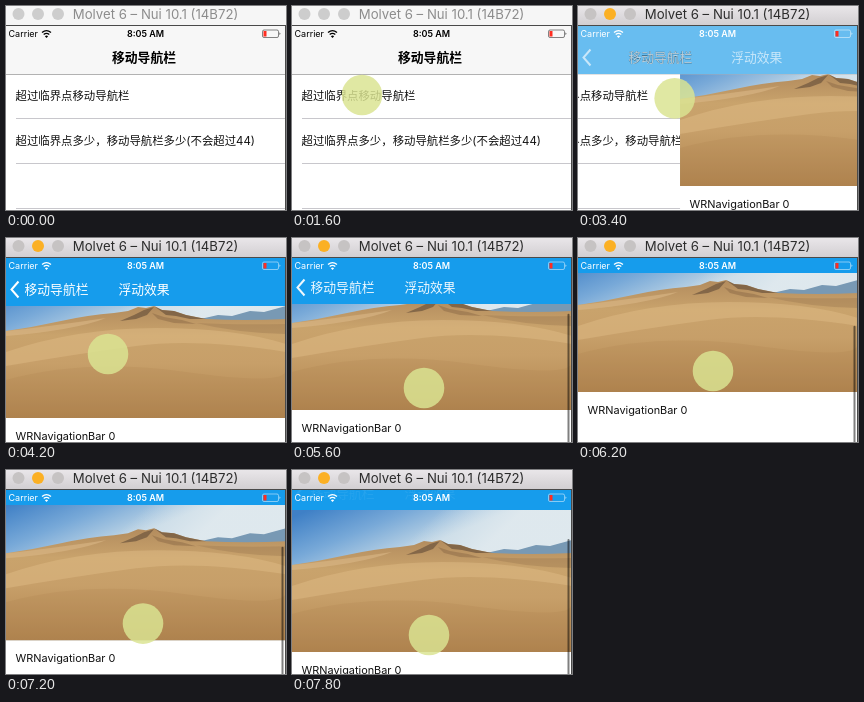
Write an HTML page that moves like this. It is 280 px wide and 204 px high and loops after 8 s.

```html
<!DOCTYPE html>
<html lang="zh-CN">
<head>
<meta charset="utf-8">
<title>移动导航栏</title>
<style>
html, body { margin: 0; width: 100%; height: 100%; overflow: hidden; background: #fff; }
svg { display: block; width: 280px; height: 204px; }
text { font-family: Inter, "Noto Sans CJK SC", sans-serif; }
.mid { text-anchor: middle; }
.nav { font-size: 12.8px; }
.bold { font-weight: 600; }
.medium { font-weight: 500; }
.light { font-weight: 300; }
.cell { font-size: 11.4px; fill: #111; }
.status { font-size: 9px; }
</style>
</head>
<body>
<svg viewBox="0 0 280 204" xmlns="http://www.w3.org/2000/svg">
  <defs>
    <linearGradient id="chrome" x2="0" y2="1">
      <stop offset="0" stop-color="#e9e6e9"/><stop offset="1" stop-color="#d2cfd2"/>
    </linearGradient>
    <linearGradient id="sky" gradientUnits="userSpaceOnUse" x1="70" y1="0" x2="100" y2="72">
      <stop offset="0" stop-color="#3f80c6"/><stop offset=".5" stop-color="#78a9d8"/><stop offset="1" stop-color="#c3d8e6"/>
    </linearGradient>
    <linearGradient id="haze" gradientUnits="userSpaceOnUse" x1="150" y1="20" x2="190" y2="62">
      <stop offset="0" stop-color="#e3ebef" stop-opacity="0"/><stop offset="1" stop-color="#e3ebef" stop-opacity=".85"/>
    </linearGradient>
    <linearGradient id="sand" gradientUnits="userSpaceOnUse" x1="0" y1="54" x2="0" y2="164">
      <stop offset="0" stop-color="#b48d5e"/><stop offset=".25" stop-color="#c9a36c"/>
      <stop offset=".5" stop-color="#c79f69"/><stop offset="1" stop-color="#b0844f"/>
    </linearGradient>
    <clipPath id="screen"><rect y="20" width="280" height="184"/></clipPath>
  </defs>

  <g clip-path="url(#screen)">
    <rect y="20" width="280" height="184" fill="#fff"/>
    <g id="list">
      <rect y="20" width="280" height="184" fill="#fff"/>
      <text class="cell" x="9.5" y="94.4">超过临界点移动导航栏</text>
      <text class="cell" x="9.5" y="139.4">超过临界点多少，移动导航栏多少(不会超过44)</text>
      <path d="M10 112.5H280M10 157.5H280M10 202.5H280" stroke="#c8c7cc"/>
    </g>

    <g id="page">
      <rect y="20" width="280" height="184" fill="#fff"/>
      <g id="scroll">
        <rect width="280" height="164" fill="url(#sky)"/>
        <rect width="280" height="75" fill="url(#haze)"/>
        <path d="M190 66L212 61 226 62 244 57 258 58 280 52V72H190Z" fill="#7899b4"/>
        <path d="M0 77Q28 73 55 67T108 59L122 57 132 53 140 54 148 52 156 56 168 57 180 61 200 65Q240 67 280 65V164H0Z" fill="url(#sand)"/>
        <path d="M148 52L156 56 168 57 180 61 200 65 184 65 170 62 160 61ZM148 53L141 61 130 65 114 67 128 61 138 56Z" fill="#72583f" opacity=".75"/>
        <path d="M146 59L158 63 176 66 190 70 168 69 152 65Z" fill="#8c6b47" opacity=".5"/>
        <path d="M0 77Q40 73 100 64Q70 76 0 82Z" fill="#dab887" opacity=".6"/>
        <path d="M0 98Q70 74 150 74T280 90V98Q190 84 130 92T0 112Z" fill="#e0bd88" opacity=".45"/>
        <path d="M190 69Q230 71 280 70V80Q230 79 190 69Z" fill="#a17d52" opacity=".45"/>
        <path d="M0 126Q80 104 180 118T280 116V164H0Z" fill="#a87c49" opacity=".18"/>
        <text class="cell" x="9.5" y="185.7" style="font-size:10.9px">WRNavigationBar 0</text>
      </g>
      <rect id="thumb" x="275.5" width="2" height="140" rx="1" fill="#000" opacity=".5"/>
    </g>

    <rect id="bar" y="20" width="280"/>
    <path id="line" d="M0 68.5H280" stroke="#b2b2b2"/>
    <g id="items">
      <path id="arrow" d="M12.5 43.5L5.5 51.5 12.5 59.5" fill="none" stroke="#fff" stroke-width="2"/>
      <text id="oldTitle" class="nav bold mid" y="55.8">移动导航栏</text>
      <text id="back" class="nav light mid" y="55.8" fill="#fff">移动导航栏</text>
      <text id="title" class="nav medium mid" y="55.8" fill="#fff">浮动效果</text>
    </g>

    <g id="status">
      <text class="status" x="2.5" y="31.3">Carrier</text>
      <text class="status bold mid" x="139.5" y="31.3">8:05 AM</text>
      <g fill="none" stroke="currentColor" stroke-width="1.3">
        <path d="M36 26.6Q40.5 22.8 45 26.6M37.7 28.6Q40.5 26.3 43.3 28.6"/>
      </g>
      <path d="M38.9 30.2Q40.5 29 42.1 30.2L40.5 32Z"/>
      <rect x="256.5" y="24" width="16" height="7.5" rx="1.5" fill="none" stroke="currentColor" stroke-width=".8" opacity=".6"/>
      <path d="M273.6 26.3Q275.2 27.7 273.6 29.1Z"/>
      <rect x="257.5" y="25" width="3" height="5.5" fill="#ff2d20"/>
    </g>
  </g>

  <rect id="chromeBar" width="280" height="19"/>
  <path d="M0 19.5H280M279.5 19V204" stroke="#4a4a4a"/>
  <g id="lights">
    <circle cx="12.5" cy="8" r="6"/><circle cx="32" cy="8" r="6"/><circle cx="52" cy="8" r="6"/>
  </g>
  <text id="window" class="mid" x="149.5" y="13.4" font-size="13.2">Molvet 6 – Nui 10.1 (14B72)</text>
  <circle id="touch" r="20.3" fill="#dbe492" opacity=".84"/>
</svg>
<script>
const LOOP = 8000, STEP = 200;
const $ = id => document.getElementById(id);
const set = (id, attrs) => {
  for (const k in attrs) $(id).setAttribute(k, attrs[k]);
};
const mix = (a, b, p) => a + (b - a) * p;
const tint = (a, b, p) => `rgb(${a.map((v, i) => Math.round(mix(v, b[i], p)))})`;

// Keys are [time, value, value...]; values are linear between keys.
const touchKeys = [[600, 130, 36], [1600, 70, 89], [2200, 84, 78], [2600, 95, 74],
  [3000, 96, 83], [3600, 97, 97], [4200, 102, 116], [5200, 131, 157],
  [5600, 132, 150], [6200, 135, 133], [6800, 137, 146], [7800, 137, 165]];
const edgeKeys = [[5200, 180], [5600, 172], [6200, 154], [6800, 162.5], [7800, 182]];
const liftKeys = [[5400, 0], [5600, 2], [5800, 20], [6000, 33], [7600, 33], [7800, 28]];

function at(keys, t) {
  const i = keys.findIndex(k => k[0] > t);
  if (i === 0) return keys[0].slice(1);
  if (i < 0) return keys[keys.length - 1].slice(1);
  const a = keys[i - 1], b = keys[i], p = (t - a[0]) / (b[0] - a[0]);
  return a.slice(1).map((v, j) => mix(v, b[j + 1], p));
}

function drawWindow(active) {
  set("chromeBar", { fill: active ? "url(#chrome)" : "#f6f6f6" });
  set("window", { fill: active ? "#2c2c2c" : "#8c8c8c" });
  [...$("lights").children].forEach((c, i) =>
    c.setAttribute("fill", active ? (i === 1 ? "#fbb024" : "#c6c3c3") : "#cdcdcd"));
}

function drawNav(push, lift) {
  const ink = push > 0 ? "#fff" : "#000";
  set("bar", { height: 48 - lift, fill: tint([247, 247, 247], [22, 156, 236], push) });
  set("line", { opacity: 1 - push });
  set("items", { transform: `translate(0 ${-lift})`, opacity: Math.max(0, 1 - lift / 30) });
  set("arrow", { opacity: push });
  set("oldTitle", { x: mix(138, 50.5, push), opacity: 1 - push });
  set("back", { x: mix(138, 50.5, push), opacity: push });
  set("title", { x: mix(250, 138, push), opacity: push });
  set("status", { fill: ink, color: ink });
}

function draw(time) {
  const t = Math.floor(time / STEP) * STEP;
  const q = Math.min(1, Math.max(0, (t - 3200) / 700));
  const push = 1 - (1 - q) ** 3;
  const [x, y] = at(touchKeys, t);
  const [edge] = at(edgeKeys, t);
  const [lift] = at(liftKeys, t);

  drawWindow(t >= 3000);
  drawNav(push, lift);
  set("list", { transform: `translate(${-84 * push} 0)` });
  set("page", { transform: `translate(${280 * (1 - push)} 0)` });
  set("scroll", { transform: `translate(0 ${edge - 164})` });
  set("thumb", { y: 69 + (182 - edge) * 0.67, visibility: t >= 5400 ? "visible" : "hidden" });
  set("touch", { cx: x, cy: y, visibility: t >= 600 ? "visible" : "hidden" });
}

const start = performance.now();
function tick() {
  draw((performance.now() - start) % LOOP);
  requestAnimationFrame(tick);
}
tick();
</script>
</body>
</html>
```
